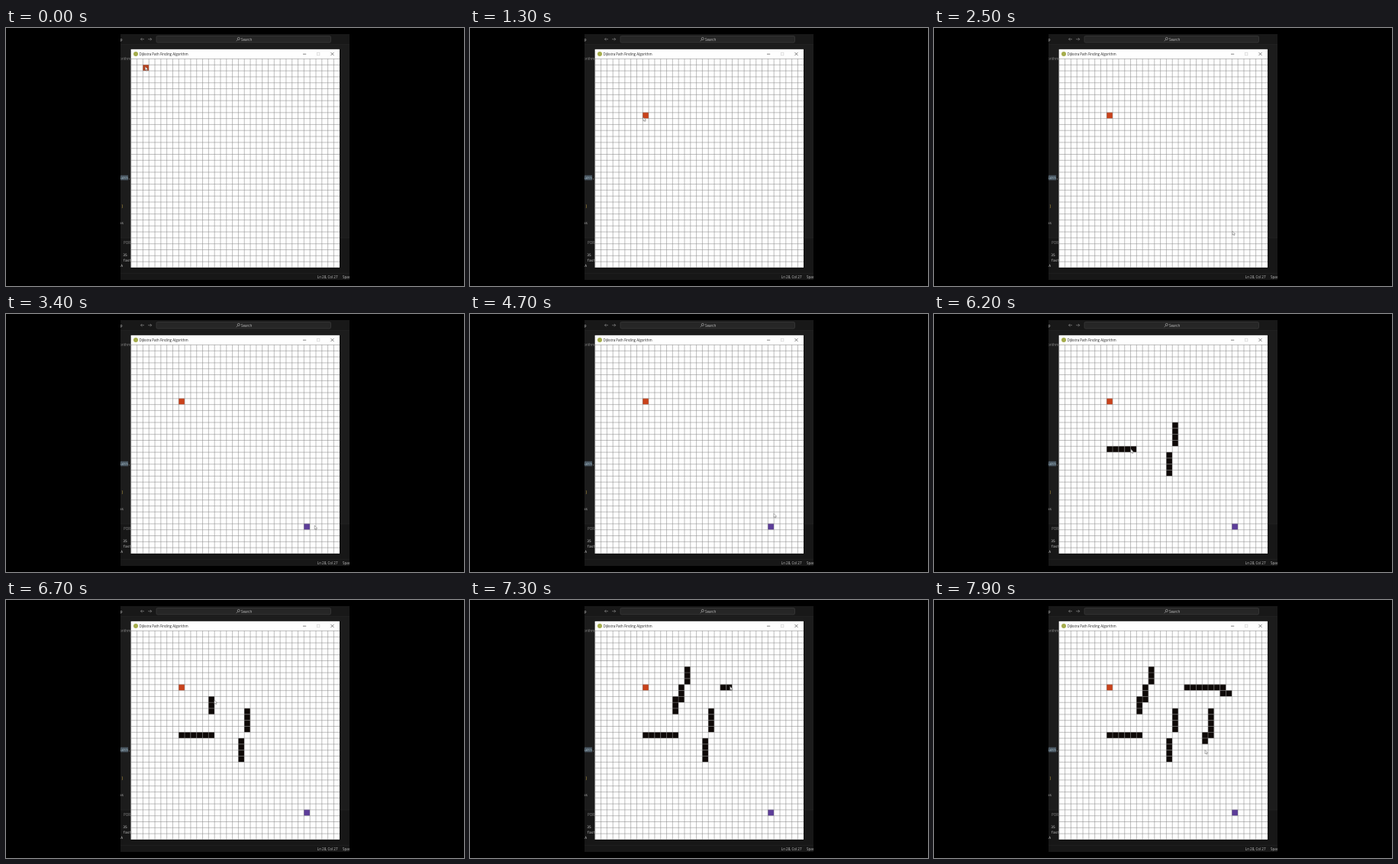
An HTML page that plays this animation: 600x338 px, repeating every 8000 ms.

```html
<!DOCTYPE html>
<html lang="en">
<head>
<meta charset="utf-8">
<title>Dijkstra Path Finding Algorithm</title>
<style>
  html, body { margin: 0; width: 100%; height: 100%; overflow: hidden; background: #000; }
  svg { display: block; width: 100%; height: 100%; }
  text { font: 4.5px "Open Sans", sans-serif; fill: #c4c4c4; white-space: pre; }
  .mono { font: 4.6px "DejaVu Sans Mono", monospace; }
  .dim { fill: #8c8c8c; }
  .title { font-size: 4.45px; fill: #222; }
  .code { fill: #a9c3d0; }
  .bracket { fill: #d8b44a; }
</style>
</head>
<body>
<svg viewBox="0 0 600 338">
  <defs>
    <clipPath id="screen"><rect x="150" y="8" width="300" height="322"/></clipPath>
  </defs>
  <rect width="600" height="338" fill="#000"/>

  <g clip-path="url(#screen)">
    <rect x="150" y="8" width="300" height="322" fill="#1c1c1c"/>
    <rect x="150" y="8" width="300" height="13.5" fill="#181818"/>
    <rect x="150" y="275" width="300" height="55" fill="#171717"/>
    <path d="M150 21.5h300M150 275h300M150 321.3h300" stroke="#262626" stroke-width=".6"/>

    <text x="149.8" y="16.5">p</text>
    <path d="M181 14.7h-4.5m1.8-1.8l-1.8 1.8 1.8 1.8M186.2 14.7h4.5m-1.8-1.8l1.8 1.8-1.8 1.8" fill="none" stroke="#999" stroke-width=".6"/>
    <rect x="197" y="10.5" width="228.5" height="8.6" rx="1.6" fill="#262626" stroke="#424242" stroke-width=".6"/>
    <g fill="none" stroke="#b5b5b5" stroke-width=".6"><circle cx="304.8" cy="14" r="1.6"/><path d="M303.6 15.2l-1.9 2"/></g>
    <text x="308" y="16.5">Search</text>

    <text x="149" y="42" class="dim">orithm</text>
    <rect x="149" y="192.8" width="11" height="6.6" fill="#46525c"/>
    <text x="149" y="198" class="mono code">idth</text>
    <text x="160" y="198" class="mono">,</text>
    <text x="151.1" y="235.3" class="mono bracket">]</text>
    <text x="148.6" y="257.3" class="mono">os</text>
    <text x="154" y="282.8" class="dim">PORTS</text>
    <text x="153.3" y="298.7" class="mono">35</text>
    <text x="153.3" y="305.7" class="mono">fast</text>
    <text x="150.2" y="312.5" class="mono">A</text>
    <text x="407.8" y="327.5">Ln 28, Col 27</text>
    <text x="441" y="327.5">Spaces</text>

    <rect x="163" y="27.3" width="274.6" height="287.2" fill="#0f0f0f"/>
    <rect x="163.6" y="27.8" width="273.4" height="286" fill="#fefefe"/>
    <circle cx="170" cy="34" r="3" fill="#a5ad4c"/>
    <text x="174.5" y="35.6" class="title">Dijkstra Path Finding Algorithm</text>
    <g fill="none" stroke-width=".6">
      <path d="M389 34.2h4.2M425.4 31.9l4.2 4.2m0-4.2l-4.2 4.2" stroke="#333"/>
      <rect x="407.3" y="32.2" width="3.6" height="3.6" stroke="#ccc"/>
    </g>
  </g>

  <!-- Board in cell units; grid lines lie over the filled cells -->
  <g transform="translate(163.6 40.3) scale(7.813)">
    <g id="cells"></g>
    <path id="lines" fill="none" stroke="#808080" stroke-width=".065"/>
    <g id="cursor">
      <path transform="scale(.115)" d="M0 0V5.6L1.3 4.5 2.2 6.4 3.1 6 2.3 4.2H4Z" fill="#fff" stroke="#555" stroke-width=".5"/>
    </g>
  </g>
</svg>

<script>
const LOOP = 8000, STEP = 100, N = 35, SAMPLES = 24;
const $ = id => document.getElementById(id);
const mix = (a, b, k) => a + (b - a) * k;
const smooth = k => k * k * (3 - 2 * k);
const linear = k => k;

let grid = '';
for (let i = 0; i < N; i++) {
  const d = i + .025;
  grid += `M${d} 0V${N}M0 ${d}H${N}`;
}
$('lines').setAttribute('d', grid);

const cells = [], moves = [];

function fillCell(col, row, color, from, to = LOOP) {
  const el = document.createElementNS('http://www.w3.org/2000/svg', 'rect');
  const attrs = { x: col, y: row, width: 1, height: 1, fill: color };
  for (const k in attrs) el.setAttribute(k, attrs[k]);
  $('cells').append(el);
  cells.push({ el, from, to });
}

// Move the pointer from where it last stopped
function go(from, to, x, y, ease = smooth) {
  const last = moves.at(-1) || { x, y };
  moves.push({ from, to, x0: last.x, y0: last.y, x, y, ease });
}

// Drag the pointer along a line; every cell it crosses turns into a wall
function drag(from, to, x0, y0, x1, y1) {
  go(moves.at(-1).to, from, x0, y0);
  go(from, to, x1, y1, linear);
  const seen = new Set();
  for (let i = 0; i <= SAMPLES; i++) {
    const k = i / SAMPLES;
    const col = Math.floor(mix(x0, x1, k)), row = Math.floor(mix(y0, y1, k));
    const key = col + ',' + row;
    if (!seen.has(key)) fillCell(col, row, '#0e0907', mix(from, to, k));
    seen.add(key);
  }
}

// Start and end cells
go(0, 0, 2.4, 1.3);
fillCell(2, 1, '#b9431f', 0, 400);
go(600, 1200, 8.1, 9.8);
fillCell(8, 9, '#c9421b', 1200);
go(1400, 2500, 29.1, 28.9);
go(2500, 2700, 29.4, 30.4);
fillCell(29, 30, '#5c3d99', 2700);
go(2800, 3200, 30.8, 30.3);
go(4300, 4400, 30.2, 30.2);
go(4600, 4700, 30, 28.3);

// Walls
go(4700, 5200, 19.5, 13.3);
drag(5450, 5550, 19.5, 13.3, 19.5, 16.7);
drag(5600, 5700, 18.5, 18.2, 18.8, 21.4);
drag(5950, 6300, 8.5, 17.5, 13.5, 17.5);
drag(6560, 7000, 13.1, 13.9, 15.9, 6.7);
drag(7250, 7500, 21.1, 9.1, 28.9, 10.2);
drag(7600, 7800, 25.9, 13.1, 24.7, 18.9);
go(7800, 7900, 24.5, 20);

function pointerAt(t) {
  const m = moves.findLast(m => m.from <= t);
  const k = m.ease(t < m.to ? (t - m.from) / (m.to - m.from) : 1);
  return [mix(m.x0, m.x, k), mix(m.y0, m.y, k)];
}

function draw(time) {
  const t = Math.floor((time % LOOP) / STEP) * STEP;
  for (const c of cells)
    c.el.setAttribute('visibility', t >= c.from && t < c.to ? 'visible' : 'hidden');
  $('cursor').setAttribute('transform', `translate(${pointerAt(t)})`);
}

const start = performance.now();
function tick() {
  draw(performance.now() - start);
  requestAnimationFrame(tick);
}
tick();
</script>
</body>
</html>
```
